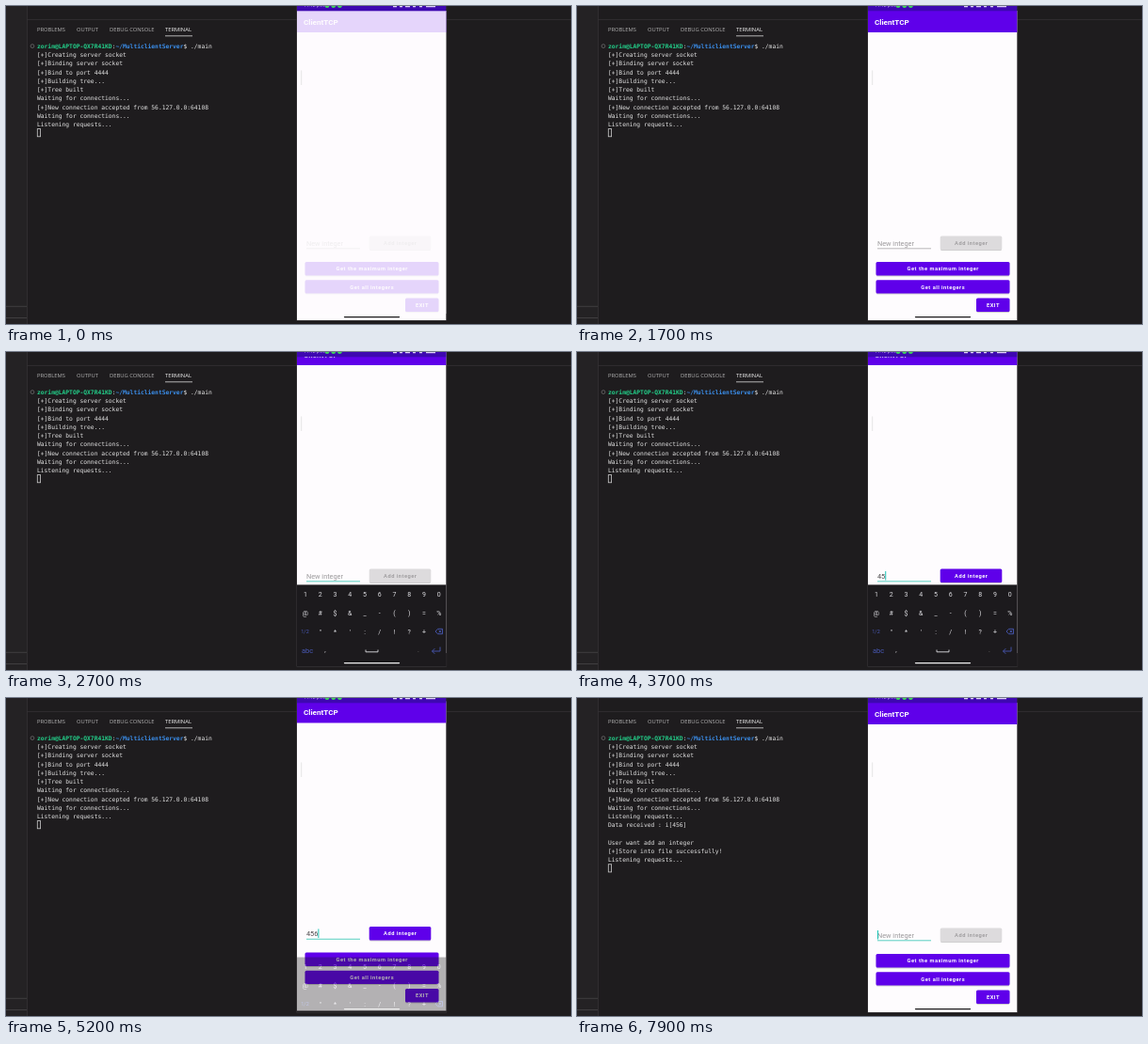
These frames come from a looping animation (600 by 338 pixels, 8000 ms). An HTML page:

```html
<!DOCTYPE html>
<html lang="en">
<head>
<meta charset="utf-8">
<style>
  html, body { margin: 0; width: 100%; height: 100%; overflow: hidden; background: #1e1c1e; }
  svg { display: block; width: 100vw; height: 100vh; }
  text { white-space: pre; }
  .tabs { font: 5.8px "Open Sans", sans-serif; fill: #b4b4b4; }
  .term { font: 6.3px "DejaVu Sans Mono", monospace; fill: #e4e4e4; }
  .app { font-family: Roboto, sans-serif; }
  .label { font: 700 5.7px Roboto, sans-serif; letter-spacing: .5px; text-anchor: middle; }
  .keys { font: 7px Roboto, sans-serif; text-anchor: middle; fill: #dcdce0; }
</style>
</head>
<body>
<svg viewBox="0 0 600 338">
  <defs>
    <clipPath id="screen"><rect x="309" y="0" width="158.3" height="334"/></clipPath>
  </defs>
  <rect width="600" height="338" fill="#1e1c1e"/>
  <rect width="22" height="338" fill="#242224"/>
  <path d="M22.5 0V338M22 14.4H600" stroke="#353335" stroke-width=".8"/>
  <path d="M0 319.3H22M0 331.5H22" stroke="#484648" stroke-width=".8"/>

  <g class="tabs">
    <text x="33" y="27.4">PROBLEMS</text>
    <text x="75" y="27.4">OUTPUT</text>
    <text x="110" y="27.4">DEBUG CONSOLE</text>
    <text x="169" y="27.4" fill="#f4f4f4">TERMINAL</text>
    <path d="M169 31.8H198" stroke="#dedede" stroke-width=".8"/>
  </g>

  <circle cx="28" cy="42.6" r="1.9" fill="none" stroke="#777" stroke-width=".7"/>
  <g class="term">
    <text x="33" y="45"><tspan fill="#23d18b" font-weight="700">zorim@LAPTOP-QX7R41KD</tspan>:<tspan fill="#3b8eea" font-weight="700">~/MulticlientServer</tspan>$ ./main</text>
    <g id="log"></g>
    <g id="reply"></g>
    <rect id="prompt" x="33.3" width="3.3" height="8.2" fill="none" stroke="#ccc" stroke-width=".8"/>
  </g>

  <path d="M308.8 0V334.3H467.7V0" fill="none" stroke="#3a383a" stroke-width=".8"/>
  <g class="app" clip-path="url(#screen)">
    <rect x="309" width="159" height="334" fill="#1c1a1d"/>
    <g id="panel">
      <rect x="309" y="5" width="159" height="329" fill="#fefcfe"/>
      <rect x="309" y="5" width="159" height="23" fill="#5f00ea"/>
      <text x="316" y="19.8" font-size="8.1" font-weight="700" fill="#fff">ClientTCP</text>
      <text id="entry" x="319" y="254.5" font-size="7.3"></text>
      <path id="underline" d="M319 257.8H376" stroke-width=".8"/>
      <path id="caret" d="M0 247V256.5" stroke="#03bfae" stroke-width=".9"/>
      <g id="buttons"></g>
    </g>
    <rect id="veil" x="309" y="5" width="159" height="322" fill="#fefcfe"/>
    <path d="M313.7 68.5V84" stroke="#dfdddf" stroke-width=".8"/>
    <g id="keyboard">
      <rect x="309" y="247.4" width="159" height="120" fill="#1c1a1d"/>
      <g id="keys" class="keys"></g>
    </g>
    <path id="home" d="M359.5 330.6H417.5" stroke-width="1.3" stroke-linecap="round"/>
    <rect x="309" width="159" height="5.3" fill="#3e08b0"/>
    <text x="316" y="1.4" font-size="5" fill="#b8a2e4">11:42 p.m.</text>
    <g fill="#3fd65a">
      <circle cx="341" cy="-.6" r="2.5"/><circle cx="347.7" cy="-.6" r="2.5"/><circle cx="354.4" cy="-.6" r="2.5"/>
    </g>
    <path d="M411 .6h4M418 .6h3M424 .6h5M432 .6h3M439 .6h3M446 .6h10" stroke="#ddd0f6" stroke-width="1.4"/>
  </g>
</svg>
<script>
const LOOP = 8000, ROW = 9.23, LIFT = 14, PURPLE = '#5f00ea', TEAL = '#2fc4b2';
const FOCUS = 2050, OPEN = 2100, CLOSE = 5000, SENT = 6900;
const typing = [[3000, '4'], [3400, '45'], [3850, '456'], [SENT, '']];
const $ = id => document.getElementById(id);
const ramp = (t, from, length) => Math.min(1, Math.max(0, (t - from) / length));
const easeOut = p => 1 - (1 - p) ** 2;

function add(parent, tag, attrs, text = '') {
  const node = document.createElementNS('http://www.w3.org/2000/svg', tag);
  for (const name in attrs) node.setAttribute(name, attrs[name]);
  node.textContent = text;
  return parent.appendChild(node);
}

function set(id, attrs) {
  for (const name in attrs) $(id).setAttribute(name, attrs[name]);
}

function print(parent, lines, first) {
  lines.forEach((line, i) => add(parent, 'text', { x: 33, y: 45 + (first + i) * ROW }, line));
}

print($('log'), [
  '[+]Creating server socket', '[+]Binding server socket', '[+]Bind to port 4444',
  '[+]Building tree...', '[+]Tree built', 'Waiting for connections...',
  '[+]New connection accepted from 56.127.0.0:64108',
  'Waiting for connections...', 'Listening requests...'
], 1);
print($('reply'), [
  'Data received : i[456]', '', 'User want add an integer',
  '[+]Store into file successfully!', 'Listening requests...'
], 10);

function button(x, y, width, label) {
  const group = add($('buttons'), 'g', {});
  add(group, 'rect', { x: x + .3, y: y + .8, width: width - .6, height: 14.6, rx: 1.5, fill: '#000', opacity: .18 });
  const face = add(group, 'rect', { x, y, width, height: 14.4, rx: 1.5, fill: PURPLE });
  const text = add(group, 'text', { x: x + width / 2 + .25, y: y + 9.3, class: 'label', fill: '#fff' }, label);
  return { face, text };
}

const addButton = button(385.7, 244.5, 65.6, 'Add integer');
button(317.5, 272, 142, 'Get the maximum integer');
button(317.5, 291.2, 142, 'Get all integers');
button(424, 310.5, 35.5, 'EXIT');

const keys = $('keys');
['1234567890', '@#$&_-()=%', ' "*\':/!?+ '].forEach((row, r) =>
  [...row].forEach((key, i) =>
    add(keys, 'text', { x: 318 + i * 15.75, y: 259.6 + r * 20 }, key)));
const blue = '#4858b4';
add(keys, 'text', { x: 317.5, y: 299, fill: blue, 'font-size': 5.5 }, '1/2');
add(keys, 'text', { x: 320, y: 319.6, fill: blue, 'font-size': 7.5 }, 'abc');
add(keys, 'text', { x: 339, y: 319 }, ',');
add(keys, 'text', { x: 438, y: 319, fill: '#777' }, '.');
const stroke = (d, color) => add(keys, 'path', { d, fill: 'none', stroke: color, 'stroke-width': .9 });
stroke('M382 316.5V318.8H395V316.5', '#dcdce0');
stroke('M456 297L458.5 294.3H463.5V299.7H458.5ZM459.7 295.7L462 298.3M462 295.7L459.7 298.3', blue);
stroke('M461 313.5V318H452.5M455.3 315.2L452.5 318L455.3 320.8', blue);

function draw(t) {
  const typed = typing.filter(step => t >= step[0]).pop();
  const value = typed ? typed[1] : '';
  const focused = t >= FOCUS;
  const opening = easeOut(ramp(t, OPEN, 220));
  const closing = ramp(t, CLOSE, 300);
  const shown = opening - closing;

  set('veil', { opacity: .85 * (1 - ramp(t, 0, 350)) });
  set('panel', { transform: `translate(0 ${-LIFT * (opening - easeOut(closing))})` });
  set('keyboard', { transform: `translate(0 ${42 * (1 - shown)})`, opacity: shown });
  set('home', { stroke: t > OPEN + 80 && t < CLOSE + 280 ? '#f0f0f0' : '#1a181a' });

  $('entry').textContent = value || 'New integer';
  set('entry', { fill: value ? '#4a484a' : '#9b999b' });
  set('underline', { stroke: focused ? TEAL : '#a8a6a8' });
  const blinkStart = typed ? typed[0] : FOCUS;
  const caretOn = focused && (t - blinkStart) % 1000 < 500;
  set('caret', { transform: `translate(${319.5 + value.length * 4.12})`, opacity: +caretOn });
  addButton.face.setAttribute('fill', value ? PURPLE : '#dddbdd');
  addButton.text.setAttribute('fill', value ? '#fff' : '#a09ea0');

  const answered = t >= SENT;
  set('reply', { visibility: answered ? 'visible' : 'hidden' });
  set('prompt', { y: 130.6 + (answered ? 5 * ROW : 0) });
}

const start = performance.now();
function tick() {
  draw((performance.now() - start) % LOOP);
  requestAnimationFrame(tick);
}
tick();
</script>
</body>
</html>
```
